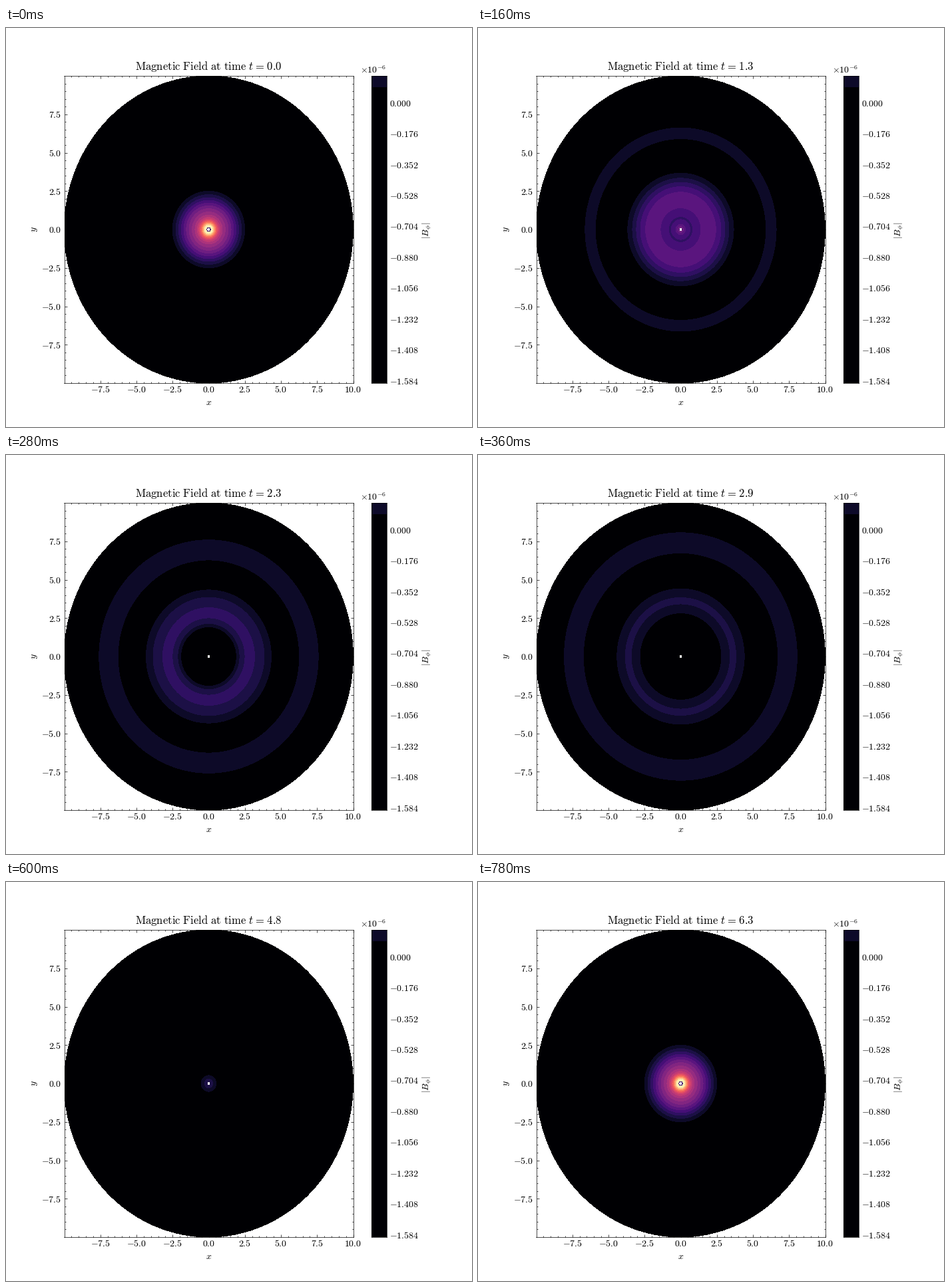
Write a matplotlib script that moves like this. It is 700x600 px and loops after 800 ms.

```python
import numpy as np
import matplotlib.pyplot as plt
from matplotlib.animation import FuncAnimation

plt.rcParams.update({
    "mathtext.fontset": "cm",
    "font.family": "DejaVu Serif",
    "font.size": 10,
    "axes.linewidth": 0.5,
})

FRAMES = 40
STEP = 0.05          # contour spacing as a fraction of the colour range
R_MAX, R_HOLE = 10, 0.085
R_FAR = 5            # where the outgoing wave takes over


def decay(r, scale, power):
    return np.exp(-(np.abs(r) / scale) ** power)


def wave_parts(r):
    """Cosine and sine parts of the oscillating field at radius r."""
    near_cos = (0.84 * decay(r, 0.43, 1.5) + 0.46 * decay(r, 2.034, 3.26)
                - 0.09 * decay(r - 3.75, 0.85, 2))
    near_sin = 0.1 * r ** 2 * decay(r, 2.535, 2.8)
    amp = 0.074 * decay(r - 7.2, 2.1, 2)
    phase = 2.42 + 1.03 * (r - 7)
    near = r < R_FAR
    return (np.where(near, near_cos, amp * np.cos(phase)),
            np.where(near, near_sin, amp * np.sin(phase)))


def cell_centres(n):
    return ((np.arange(n) + 0.5) / n * 2 - 1) * R_MAX


xs, ys = np.meshgrid(cell_centres(434) + 0.025, cell_centres(462))
radius = np.hypot(xs, ys)
cos_part, sin_part = wave_parts(radius)

magma = plt.get_cmap("magma")
bands = magma((np.arange(20) + 0.5) * STEP)[:, :3]
bands[0] = magma(0.0)[:3]


def field_image(t):
    value = cos_part * np.cos(t) + sin_part * np.sin(t)
    rgb = bands[np.clip(value / STEP, 0, 19).astype(int)]
    glow = max(np.cos(t), 0)
    hole = R_HOLE + 0.01 * glow
    rgb[radius < hole + 0.05 * glow] = magma(0.2)[:3]
    rgb[(radius < hole) | (radius > R_MAX + 0.02)] = 1
    return rgb


def title_text(t):
    gap = r"\hspace{0.09}"
    return (r"$\mathrm{Magnetic\ Field\ at\ time}\ "
            rf"t{gap}={gap}{t:.1f}$")


fig = plt.figure(figsize=(7, 6), dpi=100, facecolor="white")

ax = fig.add_axes([0.125, 0.11, 0.62, 0.77])
image = ax.imshow(field_image(0), extent=(-R_MAX, R_MAX, -R_MAX, R_MAX),
                  origin="lower", aspect="auto", interpolation="nearest")
ax.set_xticks(np.arange(-7.5, 10.1, 2.5))
ax.set_yticks(np.arange(-7.5, 7.6, 2.5))
for axis in (ax.xaxis, ax.yaxis):
    axis.set_ticks(np.arange(-9.5, 9.6, 0.5), minor=True)
    axis.set_major_formatter(lambda v, pos: f"${v:.1f}$")
ax.tick_params(which="both", direction="in", top=True, right=True, width=0.5)
ax.tick_params(which="major", length=3, pad=3.5)
ax.tick_params(axis="x", which="major", pad=2.2)
ax.tick_params(which="minor", length=1.5)
ax.set_xlim(-R_MAX, R_MAX)
ax.set_ylim(-R_MAX, R_MAX)
ax.set_xlabel("$x$", labelpad=3.3)
ax.set_ylabel("$y$", labelpad=2)
title = ax.set_title(title_text(0), fontsize=12, pad=6.7)

# Colour bar, in units of 1e-6
low, split, high = -1.598, 0.088, 0.152
bar = fig.add_axes([0.78375, 0.11, 0.033, 0.77])
bar.set_xlim(0, 1)
bar.set_ylim(low, high)
bar.axhspan(low, split, color=bands[0], lw=0)
bar.axhspan(split, high, color=bands[1], lw=0)
bar.set_xticks([])
bar.set_yticks(-0.176 * np.arange(10))
bar.yaxis.tick_right()
bar.yaxis.set_major_formatter(lambda v, pos: f"${v + 0.0:.3f}$")
bar.tick_params(length=0, pad=2.8)
fig.text(571.5 / 700, 1 - 68.5 / 600, r"$\times 10^{-6}$",
         ha="right", va="baseline")
fig.text(632.5 / 700, 1 - 304 / 600, r"$|B_\phi|$", rotation=90,
         ha="center", va="center")


def update(i):
    t = 2 * np.pi * i / (FRAMES - 1)
    image.set_data(field_image(t))
    title.set_text(title_text(t))
    return image, title


anim = FuncAnimation(fig, update, frames=FRAMES, interval=20, repeat=True,
                     repeat_delay=0, blit=False)
plt.show()
```
